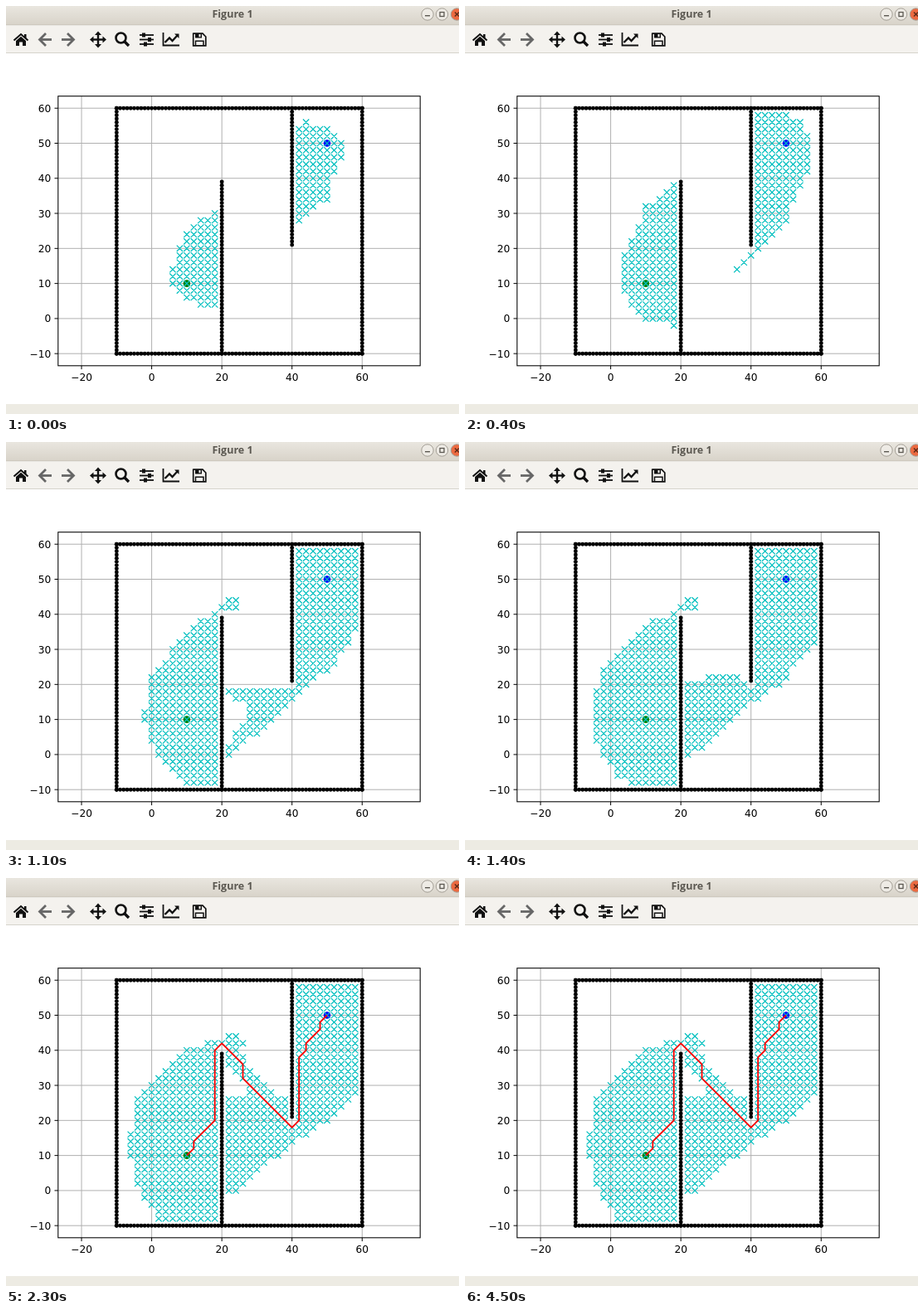
Recreate the animation shown at these times as an HTML page with a canvas. Size 546 by 492 pixels, loop 4.6 s.

```html
<!DOCTYPE html>
<html lang="en">
<head>
<meta charset="utf-8">
<title>Figure 1</title>
<style>
html, body { margin: 0; width: 100%; height: 100%; overflow: hidden; background: #fff; }
canvas { display: block; }
</style>
</head>
<body>
<canvas id="stage" width="546" height="492"></canvas>
<script>
const ctx = document.getElementById('stage').getContext('2d');
const LOOP = 4600, STEP = 100, PATH_STEP = 20;

const X = x => 175.6 + 4.228 * x;
const Y = y => 376.9 - 4.228 * y;

// --- Bidirectional A* on a 2-unit grid; returns cells in visiting order ---
function search() {
  const moves = [[1, 0], [0, 1], [-1, 0], [0, -1], [-1, -1], [-1, 1], [1, -1], [1, 1]];
  const key = (x, y) => y * 35 + x;
  const free = (x, y) => x > 0 && x < 35 && y > 0 && y < 35 &&
    !(x === 15 && y <= 25) && !(x === 25 && y >= 15);
  const side = (x, y) => {
    const at = { x, y, cost: 0 };
    return { at, open: new Map([[key(x, y), at]]), closed: new Set() };
  };
  const pick = (s, goal) => {
    let best = Infinity;
    for (const n of s.open.values()) {
      const dx = n.x - goal.x, dy = n.y - goal.y;
      const f = n.cost + Math.sqrt(dx * dx + dy * dy);
      if (f < best) { best = f; s.at = n; }
    }
  };
  const expand = s => {
    const { x, y, cost } = s.at;
    s.open.delete(key(x, y));
    s.closed.add(key(x, y));
    for (const [dx, dy] of moves) {
      const n = { x: x + dx, y: y + dy, cost: cost + (dx && dy ? Math.SQRT2 : 1) };
      const k = key(n.x, n.y);
      if (!free(n.x, n.y) || s.closed.has(k)) continue;
      if (!s.open.has(k) || s.open.get(k).cost > n.cost) s.open.set(k, n);
    }
  };

  const a = side(10, 10), b = side(30, 30), visits = [];
  while (a.open.size && b.open.size) {
    pick(a, b.at);
    pick(b, a.at);
    visits.push([a.at, b.at].map(n => [n.x * 2 - 10, n.y * 2 - 10]));
    if (a.at.x === b.at.x && a.at.y === b.at.y) break;
    expand(a);
    expand(b);
  }
  return visits;
}

const visits = search();
const route = [[10, 10], [12, 12], [12, 14], [18, 20], [18, 40], [20, 42], [26, 36], [26, 32],
  [40, 18], [42, 20], [42, 38], [44, 40], [44, 42], [48, 46], [48, 48], [50, 50]];

// --- Drawing helpers ---
function stroke(points, color, width) {
  ctx.beginPath();
  points.forEach(p => ctx.lineTo(...p));
  ctx.strokeStyle = color;
  ctx.lineWidth = width;
  ctx.stroke();
}
function fill(points, color) {
  ctx.beginPath();
  points.forEach(p => ctx.lineTo(...p));
  ctx.fillStyle = color;
  ctx.fill();
}
function rect(x, y, w, h, color) {
  ctx.fillStyle = color;
  ctx.fillRect(x, y, w, h);
}
function disc(x, y, r, color) {
  ctx.beginPath();
  ctx.arc(x, y, r, 0, 7);
  ctx.fillStyle = color;
  ctx.fill();
}
function ring(x, y, r, color, width) {
  ctx.beginPath();
  ctx.arc(x, y, r, 0, 7);
  ctx.strokeStyle = color;
  ctx.lineWidth = width;
  ctx.stroke();
}
function text(s, x, y, font, color, align) {
  ctx.font = font;
  ctx.fillStyle = color;
  ctx.textAlign = align;
  ctx.fillText(s, x, y);
}

function drawTitleBar() {
  const g = ctx.createLinearGradient(0, 0, 0, 23);
  g.addColorStop(0, '#e9e6df');
  g.addColorStop(1, '#d8d3c9');
  rect(0, 0, 546, 23, g);
  rect(0, 22.5, 546, 1, '#c5c0b6');
  text('Figure 1', 273, 14, 'bold 12.5px "Open Sans", "Noto Sans", sans-serif', '#5b5851', 'center');
  for (const [x, color] of [[508, '#eeebe5'], [525.5, '#eeebe5'], [543.5, '#ec6a41']]) {
    disc(x, 10, 7.2, color);
    ring(x, 10, 7.2, '#a39e95', 1);
  }
  rect(505, 11, 6, 1.4, '#5b5851');
  ctx.strokeStyle = '#5b5851';
  ctx.lineWidth = 1.3;
  ctx.strokeRect(523, 7.5, 5, 5);
  stroke([[541, 7.5], [546, 12.5]], '#5c2a18', 1.4);
  stroke([[541, 12.5], [546, 7.5]], '#5c2a18', 1.4);
}

function drawToolbar() {
  rect(0, 23.5, 546, 33, '#f4f2ee');
  rect(0, 56, 546, 1, '#d6d3cc');
  const ink = '#111', dim = '#666';

  // Home
  stroke([[9.5, 41.5], [18, 34], [26.5, 41.5]], ink, 2);
  rect(22, 34, 2.5, 5, ink);
  fill([[12, 42], [18, 36.8], [24, 42], [24, 48], [20, 48], [20, 43.5], [16, 43.5], [16, 48], [12, 48]], ink);

  // Back and forward
  for (const [x, d] of [[47, 1], [75, -1]]) {
    stroke([[x - 6 * d, 40.5], [x + 8 * d, 40.5]], dim, 2.8);
    stroke([[x + d, 33], [x - 6.5 * d, 40.5], [x + d, 48]], dim, 2.8);
  }

  // Pan
  stroke([[103, 40.5], [119, 40.5]], ink, 2.4);
  stroke([[111, 32.5], [111, 48.5]], ink, 2.4);
  for (let i = 0; i < 4; i++) {
    ctx.save();
    ctx.translate(111, 40.5);
    ctx.rotate(i * Math.PI / 2);
    fill([[10, 0], [5.5, -4], [5.5, 4]], ink);
    ctx.restore();
  }

  // Zoom
  ring(138.5, 38.5, 6, ink, 2.6);
  stroke([[142.5, 42.5], [148, 48]], ink, 3.4);

  // Sliders
  [[35, 166], [40.5, 173], [46, 168]].forEach(([y, knob]) => {
    stroke([[161, y], [178, y]], ink, 1.8);
    rect(knob - 2, y - 2.5, 4, 5, ink);
  });

  // Line chart
  stroke([[189.5, 32], [189.5, 47.5], [209, 47.5]], ink, 1.8);
  stroke([[191.5, 44], [197, 38.5], [200.5, 42], [206.5, 35.5]], ink, 2.3);
  fill([[203, 33.5], [208.5, 33.5], [208.5, 39]], ink);

  // Save
  stroke([[225.7, 33.2], [237, 33.2], [240.8, 37], [240.8, 47.8], [225.7, 47.8], [225.7, 32.5]], ink, 1.7);
  rect(228, 33, 8, 5.5, ink);
  rect(232.5, 34, 2, 3.2, '#f4f2ee');
  stroke([[228.5, 48], [228.5, 42.3], [238, 42.3], [238, 48]], ink, 1.5);
}

function drawAxes() {
  const left = 62.8, right = 499.2, top = 108.7, bottom = 433.8;
  const font = '12.2px "DejaVu Sans", sans-serif';
  const label = v => String(v).replace('-', '\u2212');
  for (let v = -20; v <= 60; v += 20) {
    stroke([[X(v), top], [X(v), bottom]], '#b0b0b0', 1);
    stroke([[X(v), bottom], [X(v), bottom + 4.3]], '#000', 1);
    text(label(v), X(v), 451.8, font, '#000', 'center');
  }
  for (let v = -10; v <= 60; v += 10) {
    stroke([[left, Y(v)], [right, Y(v)]], '#b0b0b0', 1);
    stroke([[left - 4.3, Y(v)], [left, Y(v)]], '#000', 1);
    text(label(v), left - 8.6, Y(v) + 4.5, font, '#000', 'right');
  }
  ctx.strokeStyle = '#000';
  ctx.lineWidth = 1.05;
  ctx.strokeRect(left, top, right - left, bottom - top);
}

function drawWalls() {
  const dot = (x, y) => disc(X(x), Y(y), 2.45, '#000');
  for (let i = -10; i <= 60; i++) {
    dot(i, -10);
    dot(i, 60);
    dot(-10, i);
    dot(60, i);
    if (i < 40) dot(20, i);
    if (i > 20) dot(40, i);
  }
}

function drawCross([x, y]) {
  const r = 3.66, cx = X(x), cy = Y(y);
  ctx.moveTo(cx - r, cy - r);
  ctx.lineTo(cx + r, cy + r);
  ctx.moveTo(cx - r, cy + r);
  ctx.lineTo(cx + r, cy - r);
}

function draw(step) {
  rect(0, 0, 546, 492, '#fff');
  drawTitleBar();
  drawToolbar();
  rect(0, 480, 546, 12, '#edebe3');
  drawAxes();
  drawWalls();
  disc(X(10), Y(10), 4.27, '#008000');
  disc(X(50), Y(50), 4.27, '#00f');

  const done = step >= PATH_STEP;
  const count = done ? visits.length : 71 + 10 * Math.ceil(1.15 * step);
  ctx.beginPath();
  visits.slice(0, count).flat().forEach(drawCross);
  ctx.strokeStyle = '#00bfbf';
  ctx.lineWidth = 1.22;
  ctx.stroke();

  if (done) {
    ctx.lineJoin = 'round';
    stroke(route.map(([x, y]) => [X(x), Y(y)]), '#f00', 1.83);
    ctx.lineJoin = 'miter';
  }
}

let shown = -1;
function tick() {
  const step = Math.min(PATH_STEP, Math.floor(performance.now() % LOOP / STEP));
  if (step !== shown) draw(shown = step);
  requestAnimationFrame(tick);
}
tick();
</script>
</body>
</html>
```
